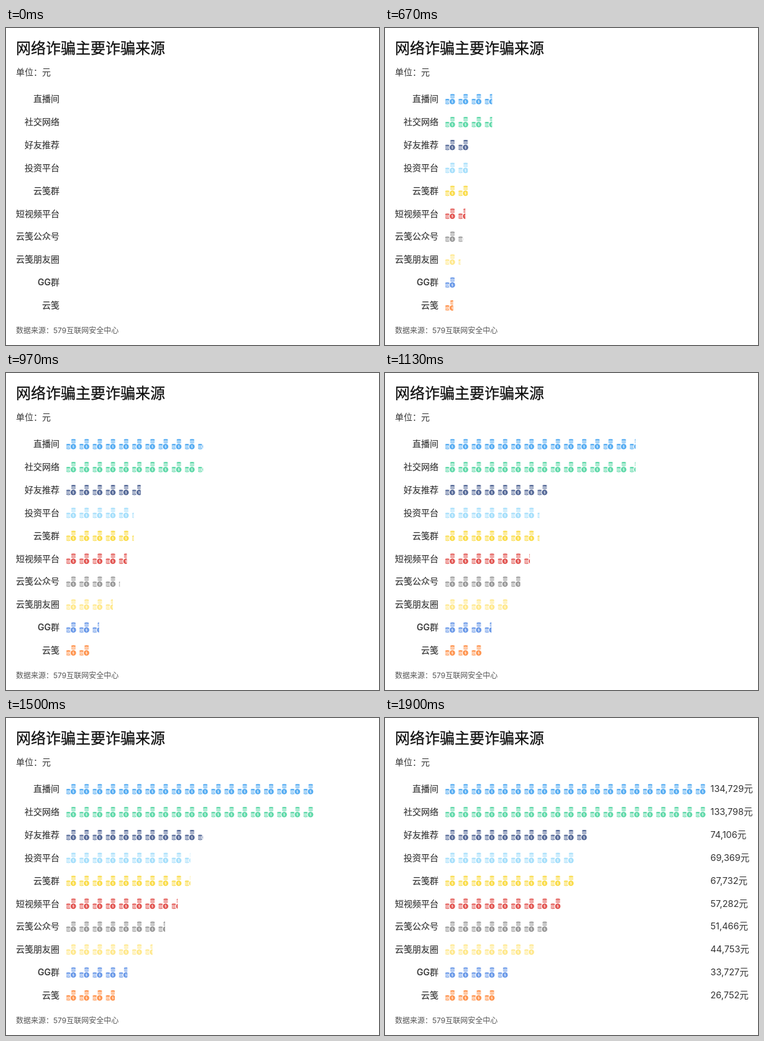
An HTML page that plays this animation: 600 px wide and 510 px high, repeating every 4.01 s.

```html
<!DOCTYPE html>
<html lang="zh-CN">
<head>
<meta charset="utf-8">
<title>网络诈骗主要诈骗来源</title>
<style>
html, body { margin: 0; width: 100%; height: 100%; overflow: hidden; background: #fff; }
svg { display: block; width: 600px; height: 510px; font: 14px Inter, "Noto Sans CJK SC", "Noto Sans CJK", sans-serif; fill: #333; }
.title { font-size: 24px; font-weight: 500; fill: #111; stroke: #111; stroke-width: .3; }
.note { font-size: 12px; fill: #555; }
.label { text-anchor: end; font-weight: 500; stroke: #333; stroke-width: .15; }
.value { font-size: 14.5px; }
.bands { fill: none; stroke: currentColor; stroke-width: .95; }
</style>
</head>
<body>
<svg viewBox="0 0 600 510">
  <defs>
    <g id="coins">
      <ellipse cx="12" cy="1.3" rx="3.5" ry="1"/>
      <path class="bands" d="M8.5 2.3q3.5 1.9 7 0m-7 1.9q3.5 1.9 7 0m-7 1.9q3.5 1.4 7 0"/>
      <ellipse cx="3.8" cy="9.2" rx="3.3" ry="1"/>
      <path class="bands" d="M.5 10.2q3.3 1.9 6.3 .2m-6.3 1.7q3.3 1.9 5.8 .5m-5.8 1.4q3.3 1.9 6 .5m-6 1.2q3.3 1.6 6.7 .1"/>
      <circle cx="11.8" cy="12.5" r="4.4"/>
      <path d="M12.9 11.6c-.3-.8-2.2-.8-2.2 .1 0 1.1 2.3 .6 2.3 1.7 0 1-2.2 1-2.4 .1M11.8 10.3v4.4" fill="none" stroke="#fff" stroke-width=".6"/>
    </g>
  </defs>
  <text class="title" x="16" y="41">网络诈骗主要诈骗来源</text>
  <text x="16" y="76">单位：元</text>
  <g id="rows"></g>
  <g id="values"></g>
  <text class="note" x="16" y="491">数据来源：579互联网安全中心</text>
</svg>
<script>
const LOOP = 4010, TICK = 100 / 3;
const LEFT = 94, PITCH = 21.2, ROW_STEP = 36.88;
// label, amount, icon count, colour
const data = [
  ['直播间', 134729, 20, '#55acf2'],
  ['社交网络', 133798, 20, '#5fd9a9'],
  ['好友推荐', 74106, 11, '#566a98'],
  ['投资平台', 69369, 10, '#a6dffb'],
  ['云笺群', 67732, 10, '#fadc4a'],
  ['短视频平台', 57282, 9, '#e25652'],
  ['云笺公众号', 51466, 8, '#999999'],
  ['云笺朋友圈', 44753, 7, '#ffe88c'],
  ['GG群', 33727, 5, '#6a99e8'],
  ['云笺', 26752, 4, '#ff9550']
];

function add(parent, tag, attrs, text) {
  const node = document.createElementNS('http://www.w3.org/2000/svg', tag);
  for (const key in attrs) node.setAttribute(key, attrs[key]);
  if (text) node.textContent = text;
  return parent.appendChild(node);
}

const rows = document.getElementById('rows');
const values = document.getElementById('values');

const bars = data.map(([label, amount, count, color], i) => {
  const baseline = Math.round(114.2 + ROW_STEP * i) + 5;
  const top = 105.9 + ROW_STEP * i;
  add(rows, 'text', { class: 'label', x: 86, y: baseline }, label);
  add(values, 'text', { class: 'value', x: 523.5, y: baseline }, amount.toLocaleString('en-US') + '元');

  const clip = add(rows, 'clipPath', { id: 'clip' + i });
  const rect = add(clip, 'rect', { x: LEFT, y: top - 2, width: 0, height: 22 });
  const group = add(rows, 'g', { 'clip-path': `url(#clip${i})`, fill: color, color });
  for (let k = 0; k < count; k++) {
    add(group, 'use', { href: '#coins', x: 96.5 + PITCH * k, y: top });
  }
  return { rect, width: count * PITCH };
});

const clamp = v => Math.min(1, Math.max(0, v));
const cubicInOut = u => u < .5 ? 4 * u ** 3 : 1 - 4 * (1 - u) ** 3;

function draw(ms) {
  // the picture advances at 30 steps a second
  const t = Math.floor((ms + 4) / TICK) * TICK;
  const progress = cubicInOut(clamp((t + 51) / 2000));
  for (const { rect, width } of bars) rect.setAttribute('width', width * progress);
  values.setAttribute('opacity', clamp((t - 1800) / 100));
}

const start = performance.now();
function frame() {
  draw((performance.now() - start) % LOOP);
  requestAnimationFrame(frame);
}
frame();
</script>
</body>
</html>
```
